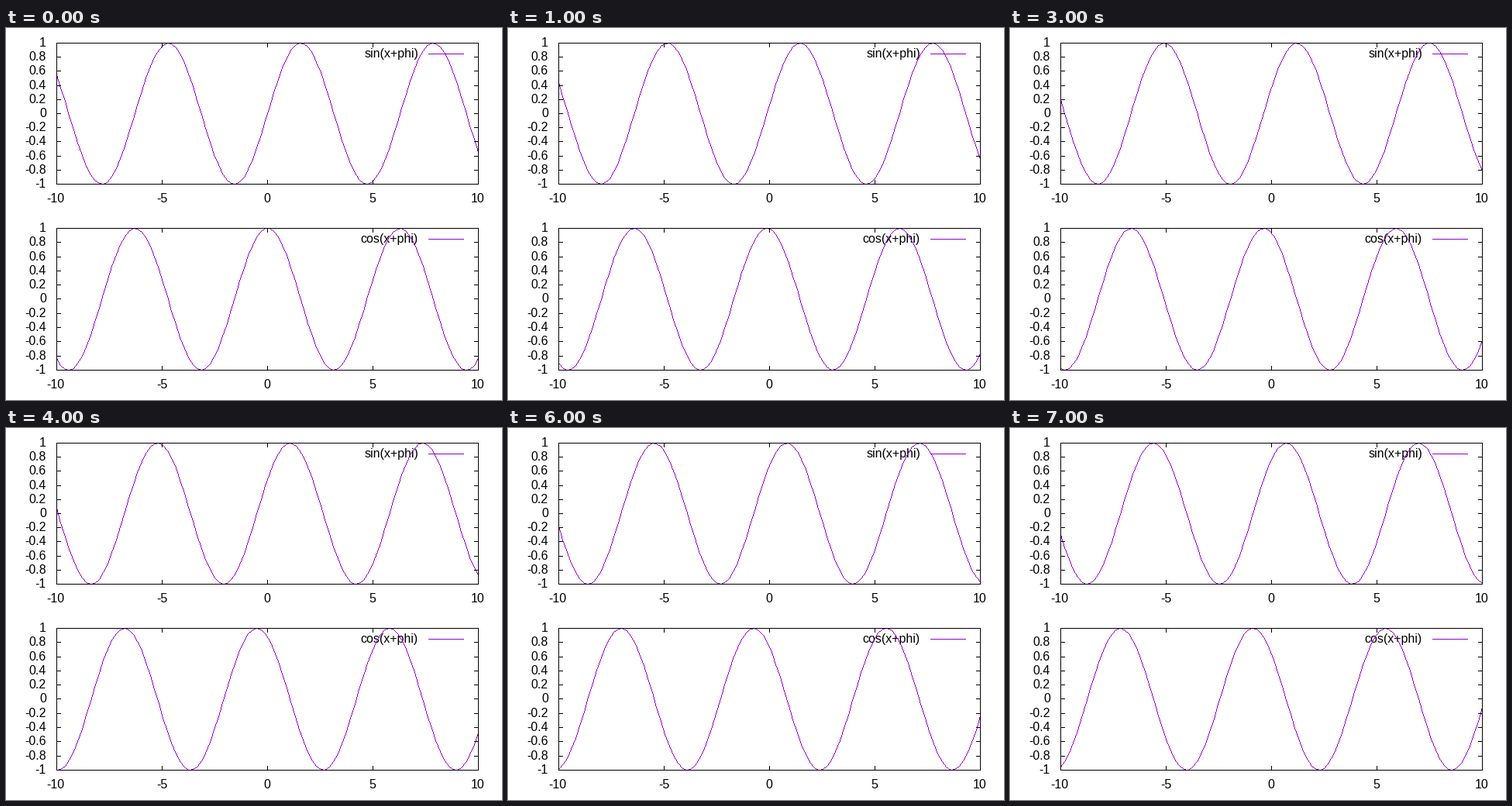
Animation, 640 px wide and 480 px high, one loop 8 s. Source, as a matplotlib script:

```python
import numpy as np
import matplotlib.pyplot as plt
from matplotlib.animation import FuncAnimation

W, H, DPI = 640, 480, 100
FRAMES, INTERVAL = 8, 1000
STEP = 2 * np.pi / 50
LEFT, RIGHT = 65, 609
TIC = 5
PURPLE = (148, 0, 211, 255)
BLACK = (0, 0, 0, 255)

# (function, name, top, bottom)
PANELS = [(np.sin, "sin", 19, 201), (np.cos, "cos", 258, 441)]
X = np.linspace(-10, 10, 100)

plt.rcParams["font.family"] = "Liberation Sans"
fig = plt.figure(figsize=(W / DPI, H / DPI), dpi=DPI, facecolor="white")


def near(v):
    return np.floor(np.asarray(v) + 0.5).astype(int)


def to_px(x):
    return LEFT + near((x + 10) / 20 * (RIGHT - LEFT))


def to_py(y, top, bottom):
    return bottom - near((y + 1) / 2 * (bottom - top))


def line(img, x0, y0, x1, y1, color):
    """One pixel wide line without smoothing."""
    n = max(abs(x1 - x0), abs(y1 - y0)) + 1
    img[near(np.linspace(y0, y1, n)), near(np.linspace(x0, x1, n))] = color


def label(x, y, s, ha):
    fig.text(x / W, 1 - y / H, s, ha=ha, va="baseline",
             fontsize=16 * 72 / DPI, color="black", zorder=-1)


def draw_border(img, top, bottom):
    for y in (top, bottom):
        line(img, LEFT, y, RIGHT, y, BLACK)
    for x in (LEFT, RIGHT):
        line(img, x, top, x, bottom, BLACK)
    for v in range(-10, 11, 5):
        x = int(to_px(v))
        line(img, x, top, x, top + TIC, BLACK)
        line(img, x, bottom - TIC, x, bottom, BLACK)
    for v in range(-5, 6):
        y = int(to_py(v / 5, top, bottom))
        line(img, LEFT, y, LEFT + TIC, y, BLACK)
        line(img, RIGHT - TIC, y, RIGHT, y, BLACK)


def draw_labels(name, top, bottom):
    for v in range(-10, 11, 5):
        label(to_px(v) - (v == -10), bottom + 24, str(v), "center")
    for v in range(-5, 6):
        label(52, to_py(v / 5, top, bottom) + 5, f"{v / 5:g}", "right")
    label(532, top + 19, f"{name}(x+phi)", "right")


def render(phi):
    img = np.zeros((H, W, 4), np.uint8)
    for func, _, top, bottom in PANELS:
        line(img, 545, top + 14, 590, top + 14, PURPLE)
        px, py = to_px(X), to_py(func(X + phi), top, bottom)
        for seg in zip(px, py, px[1:], py[1:]):
            line(img, *seg, PURPLE)
        draw_border(img, top, bottom)
    return img


for _, name, top, bottom in PANELS:
    draw_labels(name, top, bottom)
picture = fig.figimage(render(0), zorder=1, origin="upper")


def update(i):
    picture.set_data(render(i * STEP))
    return [picture]


anim = FuncAnimation(fig, update, frames=FRAMES, interval=INTERVAL,
                     repeat=True, repeat_delay=0, blit=False)
plt.show()
```
